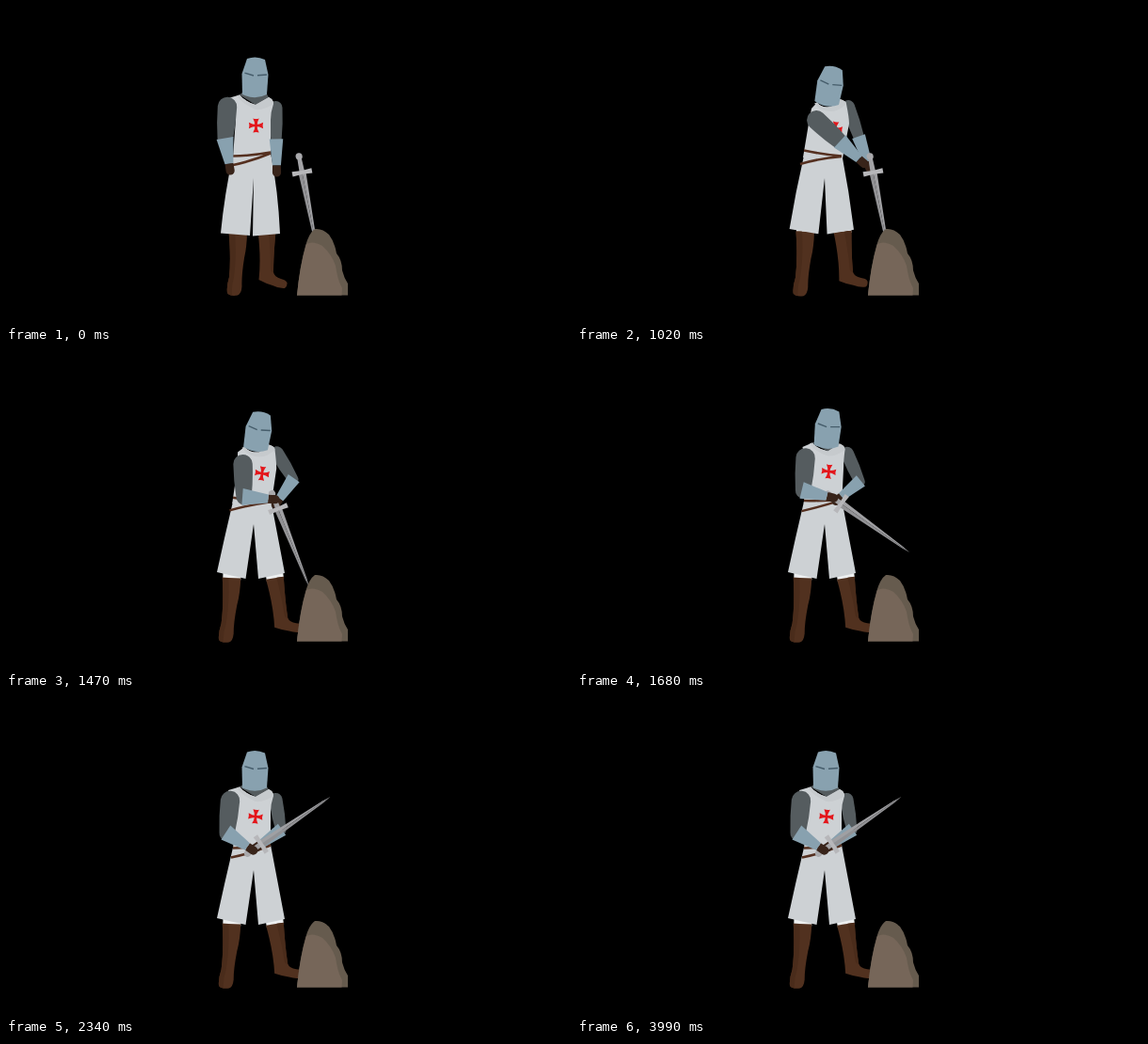
An HTML page for the animation above (4.95 s loop, 600 by 338 pixels).

```html
<!DOCTYPE html>
<html lang="en">
<head>
<meta charset="utf-8">
<title>Knight and sword</title>
<style>
  html, body { margin: 0; width: 100%; height: 100%; overflow: hidden; background: #000; }
  svg { display: block; width: 100%; height: 100%; }
</style>
</head>
<body>
<svg id="stage" viewBox="0 0 600 338"></svg>
<script>
const LOOP = 4950;
const COL = {
  steel: '#88a1af', slit: '#465d6b', mail: '#555c5f', cloth: '#cdd1d4', scarf: '#c6cacd',
  pants: '#eceeef', boot: '#51311f', bootDark: '#4a2c1b', glove: '#38241a', belt: '#553020', red: '#e3161b'
};

const stage = document.getElementById('stage');

function add(parent, tag, attrs = {}) {
  const el = document.createElementNS('http://www.w3.org/2000/svg', tag);
  for (const k in attrs) el.setAttribute(k, attrs[k]);
  parent.appendChild(el);
  return el;
}
const group = () => add(stage, 'g');
const shape = (fill, d = '', parent = stage) => add(parent, 'path', { fill, d });
const line = (stroke, width, d = '', parent = stage) =>
  add(parent, 'path', { fill: 'none', stroke, 'stroke-width': width, d });

// Back to front
const legL = group();
shape(COL.pants, 'M237 225H256V241H237Z', legL);
shape(COL.boot, 'M236.500 239Q239 268 237 288Q234 298 235 305Q238 309 246 307.500Q250 306 250.500 298Q250 287 253 268Q256 255 256 239Z', legL);
shape(COL.bootDark, 'M236.500 239H243Q245 268 242 288Q239 298 240 307.500Q236 307 235 305Q234 298 237 288Q239 268 236.500 239Z', legL);
const legR = group();
shape(COL.pants, 'M268 225H286.500V241H268Z', legR);
shape(COL.boot, 'M267.500 239Q271 268 268.500 291Q276 295 283 297Q290 300.500 296 300Q299 298 298.500 294Q297 291 292 290Q285 288 284 283Q284 265 286.500 239Z', legR);
shape(COL.bootDark, 'M279 239H286.500Q284 265 284 283Q282 284 281 280Q281 262 279 239Z', legR);

const upperR = shape(COL.mail);
const neck = shape(COL.mail);
const skirt = shape(COL.cloth);
const chest = shape(COL.cloth);
const scarf = shape(COL.scarf);
const cross = group();
for (let a = 0; a < 360; a += 90)
  add(cross, 'path', { fill: COL.red, d: 'M-1 1Q-1 -4 -3.200 -7.600Q0 -6.600 3.200 -7.600Q1 -4 1 1Z', transform: `rotate(${a})` });
const belts = line(COL.belt, 2.5);
const foreR = shape(COL.steel);
const gloveR = shape(COL.glove);

const sword = group();
shape('#a3a3a6', 'M-17 -2.200L0 -2.800V2.800L-17 2.200Z', sword);
add(sword, 'circle', { cx: -17.5, cy: 0, r: 3.6, fill: '#a9a9ac' });
shape('#a0a0a3', 'M0 -4L80 -1L89 0H0Z', sword);
shape('#929295', 'M0 4L80 1L89 0H0Z', sword);
shape('#b7b7ba', 'M-2.800 -10.600H2.500L1.800 0L2.500 10.600H-2.800L-2 0Z', sword);

shape('#665b4e', 'M309 307.500Q312 276 318 255Q322 241 328 237Q336 236 343 243Q349 251 351 263Q357 270 357 281Q359 289 363 295V307.500Z');
shape('#766659', 'M309 307.500Q312 276 319 253Q326 249 336 255Q346 264 350 276Q352 291 357 300L356.500 307.500Z');

const upperL = shape(COL.mail);
const gloveL = shape(COL.glove);
const foreL = shape(COL.steel);

const head = group();
shape(COL.steel, 'M-8.500 -20Q1 -23.500 10.500 -19L14 -3L12.500 18Q0 24.500 -13.500 18L-14 -4Z', head);
line(COL.slit, 1.4, 'M-11 -4.800L-1.500 -2M2.500 -2.200L12.500 -3', head);

const mix = (a, b, u) => a + (b - a) * u;
const mixAll = (p, q, u) => p.map((v, i) => mix(v, q[i], u));
const ease = (t, from, to) => {
  const u = Math.min(1, Math.max(0, (t - from) / (to - from)));
  return u * u * (3 - 2 * u);
};
const setD = (el, d) => el.setAttribute('d', d);
const place = (el, x, y, r, px = 0, py = 0) =>
  el.setAttribute('transform', `translate(${x + px} ${y + py}) rotate(${r}) translate(${-px} ${-py})`);
// Point writer: rest position plus a weighted offset
const shifted = w => (x, y, dx = 0, dy = 0) => `${x + dx * w} ${y + dy * w} `;

// Guard centre and angle: stuck, tilted, lifted out, held up
function swordPose(t) {
  let pose = [314.5, 177, 79];
  pose = mixAll(pose, [306.5, 179, 74.2], ease(t, 1110, 1290));
  pose = mixAll(pose, [285, 164, 67], ease(t, 1290, 1540));
  return mixAll(pose, [271, 155.3, -34.4], ease(t, 1540, 1920));
}

// Tapered limb with swelling sides and optional round ends
function limb([x1, y1], [x2, y2], r1, r2, { start, end, swell = 0 } = {}) {
  const len = Math.hypot(x2 - x1, y2 - y1) || 1;
  const nx = (y1 - y2) / len, ny = (x2 - x1) / len;
  const mx = (x1 + x2) / 2, my = (y1 + y2) / 2, rm = (r1 + r2) / 2 + swell;
  const pt = (x, y, r) => `${x + nx * r} ${y + ny * r} `;
  const turn = (r, round) => round ? `A${r} ${r} 0 0 0 ` : 'L';
  return `M${pt(x1, y1, r1)}Q${pt(mx, my, rm)}${pt(x2, y2, r2)}${turn(r2, end)}${pt(x2, y2, -r2)}`
    + `Q${pt(mx, my, -rm)}${pt(x1, y1, -r1)}${turn(r1, start)}${pt(x1, y1, r1)}Z`;
}

// Two-bone arm; side is the direction the elbow points
function drawArm(shoulder, hand, bones, side, width, [upper, fore, glove]) {
  const dx = hand[0] - shoulder[0], dy = hand[1] - shoulder[1], d = Math.hypot(dx, dy);
  const stretch = Math.max(1, d / (bones[0] + bones[1]));
  const [a, b] = bones.map(v => v * stretch);
  const along = (d * d + a * a - b * b) / (2 * d);
  const out = side * Math.sqrt(Math.max(0, a * a - along * along));
  const elbow = [
    shoulder[0] + (dx * along + dy * out) / d,
    shoulder[1] + (dy * along - dx * out) / d
  ];
  const onFore = k => [hand[0] + (hand[0] - elbow[0]) / b * k, hand[1] + (hand[1] - elbow[1]) / b * k];
  const wrist = onFore(-6.5);
  setD(upper, limb(shoulder, elbow, width, width * .8, { start: true, end: true, swell: 1.2 }));
  setD(fore, limb(onFore(-b - 1.5), wrist, width * .55 + 3.4, 4.5));
  setD(glove, limb(wrist, onFore(1), 4.4, 4.6, { end: true }));
}

function drawTunic(lean, step, headX, headY) {
  const c = shifted(lean), s = shifted(step);
  const collarL = c(248, 94.5, 7, 8), collarR = c(279, 97, 0, 2), vee = c(265, 105, 5, 2);
  const edge = `M${collarL}Q${c(253, 101, 7, 8)}${vee}L${collarR}Q${c(284, 99, 2, 2)}${c(284, 104, 2, 0)}`;
  setD(chest, `${edge}Q${c(281, 113, 8, 6)}${c(281, 121, 8, 4)}L${c(281, 158, 1, 4)}`
    + `L${c(241, 161, -1)}L${c(244, 120, 2, 5)}L${c(236, 98, 13, 11)}Z`);
  setD(scarf, `${edge}Q${c(274, 111, 4, 1)}${c(265, 110, 5, 2)}Q${c(251, 104, 7, 8)}${c(245, 95.5, 7, 8)}Z`);
  setD(neck, `M${collarL}L${headX - 9} ${headY + 12}H${headX + 9}L${collarR}L${vee}Z`);
  setD(skirt, `M${s(241, 159)}Q${s(232, 200, 0, -3)}${s(228, 241.5, -4, -7.5)}L${s(259, 244, -4.5, -3)}`
    + `L${s(263, 183)}L${s(262, 244.5, 6, -3.5)}L${s(291, 242, 5, -7)}Q${s(289, 196, 0, 2)}${s(281, 156)}Z`);
  setD(belts, `M${c(241, 159.5, 0, -6)}Q${c(262, 159, 0, -1)}${c(281, 155.5, 0, 4)}`
    + `M${c(239, 169.5, -2, -1.5)}Q${c(261, 165, -4, -3)}${c(281, 156.5, 0, 3.5)}`);
}

function draw(t) {
  const step = ease(t, 560, 1380);
  const bend = ease(t, 560, 1020);
  const lean = bend - ease(t, 1290, 1880);
  const bow = bend - ease(t, 1290, 2060);
  const reach = ease(t, 560, 1140);

  place(legL, -8 * step, step, 2 * step, 243, 276);
  place(legR, 12.5 * step, step, -9 * step, 276, 265);

  const headX = 264.5 + 4 * bow, headY = 76 + 1.5 * step + 8.5 * bow;
  place(head, headX, headY, 9 * bow);
  drawTunic(lean, step, headX, headY);
  place(cross, 265.5 - step / 2 + 9 * lean, 127 - step + 4 * lean, 5 * step + 4 * lean);

  const [x, y, angle] = swordPose(t), rad = angle * Math.PI / 180;
  place(sword, x, y, angle);
  const grip = back => [x - back * Math.cos(rad), y - back * Math.sin(rad)];

  const shoulderL = [235 + 3 * step + 17.5 * lean, 107 + 2 * step + 13 * lean];
  const shoulderR = [286.5 + 1.5 * lean, 108 - lean];
  drawArm(shoulderL, mixAll([238, 174], grip(11), reach), [35, 32.5], -1, 10.2, [upperL, foreL, gloveL]);
  drawArm(shoulderR, mixAll([287.5, 176], grip(6), reach), [33, 31.5], 1, 7, [upperR, foreR, gloveR]);
}

const start = performance.now();
function tick() {
  draw((performance.now() - start) % LOOP);
  requestAnimationFrame(tick);
}
tick();
</script>
</body>
</html>
```
